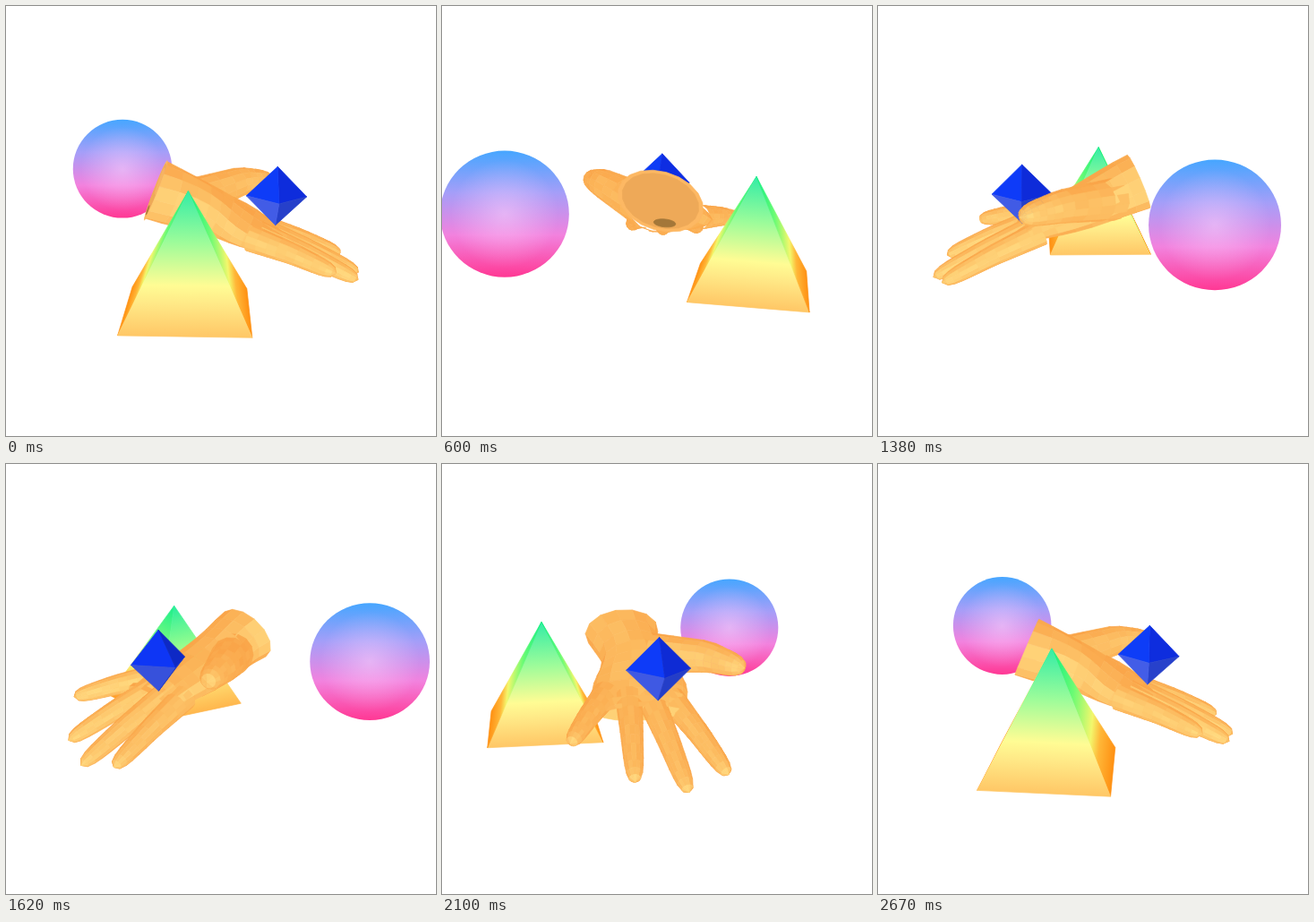
Animation of 480 by 480 pixels, one loop 2.7 s. Source, as an HTML page with a canvas:

```html
<!DOCTYPE html>
<html lang="en">
<head>
<meta charset="utf-8">
<title>Turning shapes</title>
<style>
html, body { margin: 0; width: 100%; height: 100%; overflow: hidden; background: #fff; }
canvas { display: block; width: 480px; height: 480px; }
</style>
</head>
<body>
<canvas id="stage" width="480" height="480"></canvas>
<script>
const ctx = document.getElementById('stage').getContext('2d');
const LOOP = 2700, STEP = 30;
const TAU = Math.PI * 2, RAD = Math.PI / 180;
const FOCAL = 822, DIST = 13.34, CX = 231, CY = 240, ROLL = .016;
const COS_P = Math.cos(16 * RAD), SIN_P = Math.sin(16 * RAD);

// vectors and helpers
const add = (a, b, s = 1) => a.map((v, i) => v + b[i] * s);
const sub = (a, b) => add(a, b, -1);
const mix = (a, b, t) => a.map((v, i) => v + (b[i] - v) * t);
const dot = (a, b) => a[0] * b[0] + a[1] * b[1] + a[2] * b[2];
const cross = (a, b) => [
  a[1] * b[2] - a[2] * b[1],
  a[2] * b[0] - a[0] * b[2],
  a[0] * b[1] - a[1] * b[0]
];
const unit = a => a.map(v => v / (Math.hypot(...a) || 1));
const clamp = (v, lo = 0, hi = 1) => Math.min(hi, Math.max(lo, v));
const repeat = (n, make) => Array.from({ length: n }, (_, i) => make(i));
const rgb = c => `rgb(${c.map(v => Math.round(clamp(v, 0, 255)))})`;
const polar = (radius, degrees, y) =>
  [radius * Math.sin(degrees * RAD), y, radius * Math.cos(degrees * RAD)];

// Turns a scene point into camera space: right, up, towards the viewer.
function toCamera([x, y, z], turn) {
  const c = Math.cos(turn), s = Math.sin(turn);
  const depth = z * c - x * s;
  return [x * c + z * s, y * COS_P - depth * SIN_P, depth * COS_P + y * SIN_P];
}

function project([x, y, z]) {
  const k = FOCAL / (DIST - z);
  return [CX + (x + y * ROLL) * k, CY - (y - x * ROLL) * k];
}

// hand
const handFaces = [];
const SIDES = 14;

function ringAt(centre, tangent, width, thickness) {
  const side = unit(cross(tangent, [0, 1, 0]));
  const up = cross(side, tangent);
  return repeat(SIDES, j => {
    const q = j / SIDES * TAU;
    return add(add(centre, side, width * Math.cos(q)), up, thickness * Math.sin(q));
  });
}

// Skins a tube around spine(t), 0 <= t <= 1; size(t) is [half width, half thickness].
function addTube(spine, size, steps) {
  const rings = repeat(steps + 1, i => {
    const t = 1 - (1 - i / steps) ** 1.4;
    const tangent = unit(sub(spine(Math.min(1, t + .03)), spine(Math.max(0, t - .03))));
    return ringAt(spine(t), tangent, ...size(t));
  });
  for (let i = 0; i < steps; i++) {
    for (let j = 0; j < SIDES; j++) {
      const k = (j + 1) % SIDES;
      handFaces.push({
        points: [rings[i][j], rings[i + 1][j], rings[i + 1][k], rings[i][k]],
        noise: Math.sin(handFaces.length * 78.2)
      });
    }
  }
  return rings;
}

function addDigit(base, middle, tip, thick, thin) {
  const spine = t => t < .5 ? mix(base, middle, t * 2) : mix(middle, tip, t * 2 - 1);
  addTube(spine, t => {
    const r = (thick + (thin - thick) * t) * Math.sqrt(1 - t ** 16);
    return [r, r];
  }, 11);
}

function addPalm() {
  const wrist = [-1, .65, .36], knuckles = [1.16, -.25, .32];
  const spine = t => add(mix(wrist, knuckles, t), [0, 0, -.13], Math.sin(Math.PI * t) ** 2);
  const size = t => [.7 - .12 * Math.sin(TAU * t), .52 - .36 * t ** 1.4];
  const rings = addTube(spine, size, 11);
  handFaces.push({ points: rings.pop().reverse(), noise: 1 });
  addOpening(rings[0]);
}

function addOpening(rim) {
  const centre = mix(rim[0], rim[SIDES / 2], .5);
  const side = sub(rim[0], centre);
  const up = sub(rim[Math.round(SIDES / 4)], centre);
  const layer = (color, x, y, rx, ry) => handFaces.push({
    points: repeat(20, j => {
      const q = j / 20 * TAU;
      return add(add(centre, side, x + rx * Math.cos(q)), up, y + ry * Math.sin(q));
    }),
    color,
    bias: .3 + handFaces.length * 1e-5
  });
  layer([253, 184, 99], 0, 0, 1, 1);
  layer([238, 169, 88], 0, 0, .9, .9);
  layer([246, 180, 99], .1, .35, .68, .42);
  layer([174, 127, 62], -.58, -.44, .2, .23);
  layer([164, 119, 57], -.02, -.72, .26, .13);
}

addPalm();
addDigit([-.5, .38, .08], [.5, .52, -.95], [1.14, .47, -1.42], .38, .17);
for (let s = 0; s < 4; s++) {
  const base = [.8 + .1 * Math.sin(Math.PI * s / 3) - .05 * s, -.14 + .03 * s, -.26 + .37 * s];
  const tip = [
    2.49 + .44 * s - .2 * s * s,
    -.85 - .295 * s + .148 * s * s,
    -.83 + .61 * s + .062 * s * s
  ];
  addDigit(base, add(mix(base, tip, .5), [0, .03, 0]), tip, .23, .13);
}

// solids
const square = (centre, radius, spin) => repeat(4, i =>
  add(centre, polar(radius, i * 90 + spin, 0)));

const pyramidFoot = polar(1.93, -11.5, -.95);
const pyramidTop = add(pyramidFoot, [0, 1.96, 0]);
const pyramidBase = square(pyramidFoot, 1.4, 45);

const gemCentre = polar(1.13, 88, .49);
const gemBelt = square(gemCentre, .54, 0);
const gemTop = add(gemCentre, [0, .54, 0]);
const gemBottom = add(gemCentre, [0, -.54, 0]);

const ball = polar(2.75, -137, .508);

// Offset, colour on a face turned to the viewer, colour on a slanted face.
const PYRAMID_STOPS = [
  [0, [50, 236, 166], [22, 238, 138]],
  [.35, [156, 252, 154], [120, 251, 126]],
  [.65, [255, 252, 148], [246, 248, 118]],
  [.78, [255, 232, 134], [255, 196, 76]],
  [1, [255, 199, 102], [255, 158, 40]]
];
const BALL_COLORS = [[70, 166, 255], [165, 158, 248], [242, 130, 222], [255, 56, 148]];

const faceNormal = p => unit(cross(sub(p[1], p[0]), sub(p[2], p[0])));
const facesViewer = (points, normal) => dot(normal, sub([0, 0, DIST], points[0])) > 0;

function fillFace(points, fill) {
  ctx.beginPath();
  points.forEach(p => ctx.lineTo(...project(p)));
  ctx.closePath();
  ctx.fillStyle = ctx.strokeStyle = fill;
  ctx.lineWidth = .7;
  ctx.lineJoin = 'round';
  ctx.fill();
  ctx.stroke();
}

function drawPyramid(turn) {
  const top = toCamera(pyramidTop, turn);
  const base = pyramidBase.map(p => toCamera(p, turn));
  base.forEach((left, i) => {
    const points = [top, left, base[(i + 1) % 4]];
    const normal = faceNormal(points);
    if (!facesViewer(points, normal)) return;
    // The bands run parallel to the foot of the face.
    const [a, b, c] = points.map(project);
    const dx = c[0] - b[0], dy = c[1] - b[1];
    const along = ((a[0] - b[0]) * dx + (a[1] - b[1]) * dy) / (dx * dx + dy * dy);
    const gradient = ctx.createLinearGradient(...a, b[0] + dx * along, b[1] + dy * along);
    const lit = clamp((normal[2] - .62) / .33, -.35, 1);
    PYRAMID_STOPS.forEach(([at, front, slant]) =>
      gradient.addColorStop(at, rgb(mix(slant, front, lit))));
    fillFace(points, gradient);
  });
}

function drawGem(turn) {
  const belt = gemBelt.map(p => toCamera(p, turn));
  const top = toCamera(gemTop, turn), bottom = toCamera(gemBottom, turn);
  belt.forEach((left, i) => {
    const right = belt[(i + 1) % 4];
    [[top, left, right], [bottom, right, left]].forEach((points, lower) => {
      const n = faceNormal(points);
      if (!facesViewer(points, n)) return;
      fillFace(points, rgb(lower
        ? [52 - 24 * n[0], 78 - 24 * n[0], 216 - 24 * n[0]]
        : [14, 52 - 14 * n[0], 205 - 24 * n[0] + 40 * n[2]]));
    });
  });
}

function drawBall(turn) {
  const centre = toCamera(ball, turn);
  const [x, y] = project(centre);
  const r = 1.01 * FOCAL / (DIST - centre[2]);
  const body = ctx.createLinearGradient(x, y - r, x, y + r);
  BALL_COLORS.forEach((color, i) => body.addColorStop(i / 3, rgb(color)));
  const glow = ctx.createRadialGradient(x, y, 0, x, y, r * .85);
  glow.addColorStop(0, 'rgba(255,215,255,.5)');
  glow.addColorStop(1, 'rgba(255,215,255,0)');
  ctx.beginPath();
  ctx.ellipse(x, y, r * Math.hypot(1, (x - CX) / FOCAL), r, 0, 0, TAU);
  for (const fill of [body, glow]) {
    ctx.fillStyle = fill;
    ctx.fill();
  }
}

const LIGHT = unit([0, -.22, 1]);

function handItem(face, turn) {
  const points = face.points.map(p => toCamera(p, turn));
  const n = points.length;
  // Diagonals give a stable normal for quads that narrow to a point.
  const normal = n === 4
    ? unit(cross(sub(points[2], points[0]), sub(points[3], points[1])))
    : unit(cross(sub(points[n >> 2], points[0]), sub(points[n >> 1], points[0])));
  if (!facesViewer(points, normal)) return null;
  const light = clamp(dot(normal, LIGHT)) ** 1.6 + .07 * face.noise;
  const color = face.color || mix([250, 166, 74], [255, 214, 124], light);
  const depth = points.reduce((sum, p) => sum + p[2], 0) / n + (face.bias || 0);
  return { depth, draw: () => fillFace(points, rgb(color)) };
}

function draw(time) {
  const turn = Math.floor(time % LOOP / STEP) * STEP / LOOP * TAU;
  const solid = (centre, paint, bias = 0) => ({
    depth: toCamera(centre, turn)[2] + bias,
    draw: () => paint(turn)
  });
  const items = [
    solid(ball, drawBall),
    solid(pyramidFoot, drawPyramid),
    solid(gemCentre, drawGem, .25),
    ...handFaces.map(face => handItem(face, turn)).filter(Boolean)
  ];
  ctx.fillStyle = '#fff';
  ctx.fillRect(0, 0, 480, 480);
  items.sort((a, b) => a.depth - b.depth).forEach(item => item.draw());
}

const start = performance.now();
function tick(now) {
  draw(Math.max(0, now - start));
  requestAnimationFrame(tick);
}
draw(0);
requestAnimationFrame(tick);
</script>
</body>
</html>
```
